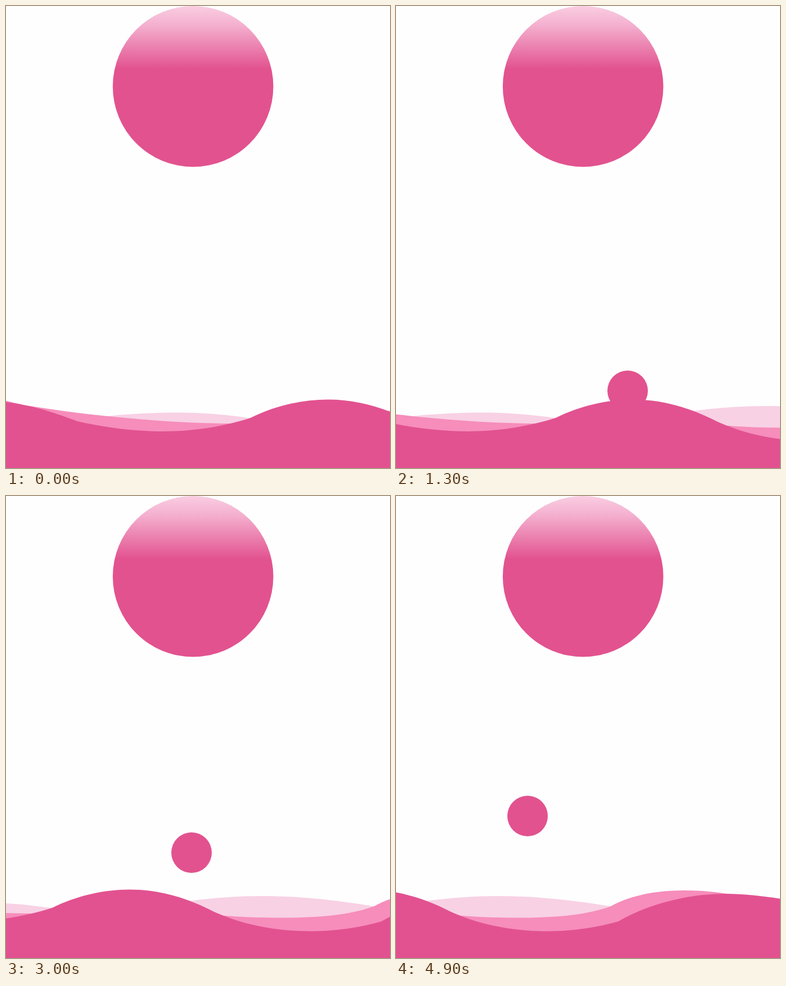
These frames come from a looping animation (683 by 820 pixels, 5 s). An HTML page:

```html
<!DOCTYPE html>
<html lang="en">
<head>
<meta charset="utf-8">
<title>Falling dots</title>
<style>
  html, body { margin: 0; width: 100%; height: 100%; overflow: hidden; background: #fefefe; }
  svg { display: block; width: 683px; height: 820px; }
</style>
</head>
<body>
<svg viewBox="0 0 683 820">
  <defs>
    <linearGradient id="shade" x1="0" y1="0" x2="0" y2="112" gradientUnits="userSpaceOnUse">
      <stop offset="0" stop-color="#f9cde2"/>
      <stop offset="0.3" stop-color="#f4b0cf"/>
      <stop offset="1" stop-color="#e2528f"/>
    </linearGradient>
  </defs>
  <circle id="dot" r="36" fill="#e2528f"/>
  <circle cx="332.7" cy="142.8" r="142.8" fill="url(#shade)"/>
  <g id="waves">
    <path fill="#f8d1e4" d="M180 820V728C220 724 265 721.5 305 721.5C350 721.5 400 726 437 732
      L685 718C725 713 765 710 808 710C880 710 955 719 1010 729V820Z"/>
    <path fill="#f68dbb" d="M-10 820V698C10 703 20 706 30 708C80 716 130 723 180 728
      C240 734 320 741 405 741L743 745C780 748 820 748.5 846 748.5C920 748.5 970 742 1008 728
      C1045 707 1095 700 1138 700C1170 700 1195 703 1215 706L1330 730V820Z"/>
    <path fill="#e25290" d="M-10 820V702C50 708 90 724 127 737C170 747 225 755 280 755
      C340 755 395 744 435 731C478 710 525 698.5 573 698.5C622 698.5 670 712 713 733
      C760 757 825 772.5 893 772.5C945 772.5 985 765 1021 755C1070 726 1140 706 1213 706
      C1250 706 1285 711 1330 718V820Z"/>
  </g>
</svg>
<script>
  const LOOP = 5000, STEP = 100;
  const dot = document.getElementById('dot');
  const waves = document.getElementById('waves');

  // [time, leftward travel of the waves]
  const drift = [[0, 0], [800, 93], [2000, 232], [3000, 353], [3800, 451], [4300, 530.5], [4900, 625.5]];

  // Each drop: column, and [time, height] points of its fall
  const drops = [
    { x: 412, fall: [[0, 170], [800, 486], [1800, 880]] },
    { x: 330, fall: [[1800, 153], [3000, 633], [3600, 873]] },
    { x: 234, fall: [[3600, 64], [4300, 344], [4900, 568]] }
  ];

  function at(points, t) {
    let i = 1;
    while (i < points.length - 1 && t > points[i][0]) i++;
    const [t0, v0] = points[i - 1], [t1, v1] = points[i];
    return v0 + (v1 - v0) * (t - t0) / (t1 - t0);
  }

  function draw(now) {
    const t = Math.floor(now % LOOP / STEP) * STEP;
    const drop = drops[t < 1800 ? 0 : t < 3600 ? 1 : 2];
    dot.setAttribute('cx', drop.x);
    dot.setAttribute('cy', at(drop.fall, t));
    waves.setAttribute('transform', `translate(${-at(drift, t)} 0)`);
  }

  let start;
  function tick(now) {
    start ??= now;
    draw(now - start);
    requestAnimationFrame(tick);
  }
  draw(0);
  requestAnimationFrame(tick);
</script>
</body>
</html>
```
